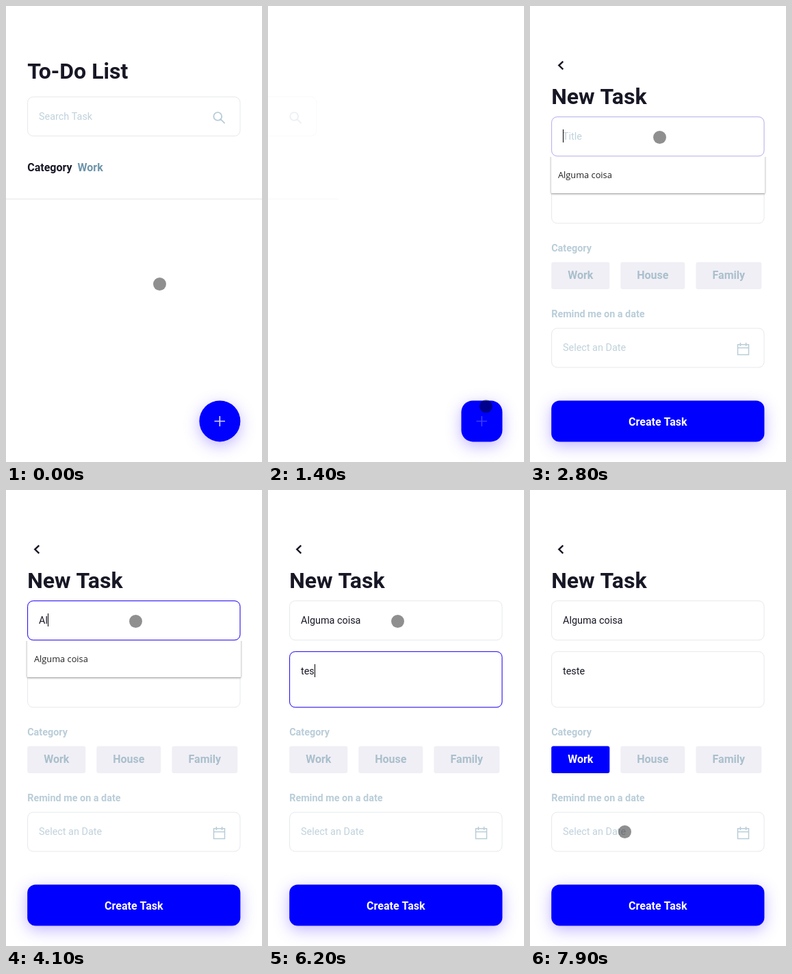
Animation of 374x665 px, one loop 8 s. Source, as an HTML page with a canvas:

```html
<!DOCTYPE html>
<html lang="en">
<head>
<meta charset="utf-8">
<title>To-Do List</title>
<style>
html, body { margin: 0; width: 100%; height: 100%; overflow: hidden; background: #fff; }
canvas { display: block; }
</style>
</head>
<body>
<canvas id="stage" width="374" height="665"></canvas>
<script>
const g = document.getElementById('stage').getContext('2d');
const LOOP = 8000, STEP = 100;
const WIDTH = 374, LEFT = 31.2, RIGHT = 342.4;
const INK = '#171725', PALE = '#b9cdd8', HINT = '#c0d2dc', BLUE = '#0000ff';
const REGULAR = '14.4px Roboto, sans-serif', BOLD = 'bold 16px Roboto, sans-serif';
const LABEL = 'bold 14.4px Roboto, sans-serif', TITLE = 'bold 32px Roboto, sans-serif';
const TITLE_FOCUS = 2800, NOTE_FOCUS = 5000, NOTE_BLUR = 7500;

// Pointer moves after its starting point
const start = { x: 224.5, y: 405.5 };
const moves = [
  { from: 100, to: 600, x: 324, y: 602.5 },
  { from: 1300, to: 1800, x: 227.5, y: 280.5 },
  { from: 2100, to: 2400, x: 189.5, y: 191.5 },
  { from: 6700, to: 7200, x: 89.5, y: 390.5 },
  { from: 7500, to: 7900, x: 138.5, y: 498.5 }
];

const between = (t, from, to) => t >= from && t < to;
const ramp = (t, from, to) => Math.min(1, Math.max(0, (t - from) / (to - from)));

function ease(t, from, to) {
  const k = ramp(t, from, to);
  return k * k * k * (10 - 15 * k + 6 * k * k);
}

// Border strength and caret of an input that is focused from one time to another
const glow = (t, from, to) => ramp(t, from - 100, from + 300) - ramp(t, to - 100, to + 300);
const caretOn = (t, from, to) => between(t, from, to) && (t - from) % 1200 < 600;

function text(s, x, y, font, color, align = 'left') {
  g.font = font;
  g.fillStyle = color;
  g.textAlign = align;
  g.fillText(s, x, y);
}

function box(x, y, w, h, r, fill, stroke) {
  g.beginPath();
  g.roundRect(x, y, w, h, r);
  if (fill) { g.fillStyle = fill; g.fill(); }
  if (stroke) { g.strokeStyle = stroke; g.lineWidth = 1; g.stroke(); }
}

function lines(d, color, width) {
  g.strokeStyle = color;
  g.lineWidth = width;
  g.stroke(new Path2D(d));
}

// Runs draw with the current opacity multiplied by alpha
function faded(alpha, draw) {
  if (alpha <= 0) return;
  g.save();
  g.globalAlpha *= alpha;
  draw();
  g.restore();
}

function field(y, h, focus = 0) {
  const x = LEFT + .4, w = RIGHT - LEFT - .8;
  box(x, y, w, h, 8, '#fff', '#e6e8eb');
  faded(focus, () => box(x, y, w, h, 8, null, '#1d00f5'));
}

function input(value, progress, hint, y, caret) {
  const typed = value.slice(0, Math.ceil(value.length * progress));
  text(typed || hint, 48, y, REGULAR, typed ? INK : HINT);
  if (caret) {
    g.fillStyle = '#000';
    g.fillRect(48 + Math.round(g.measureText(typed).width), y - 15, 1, 19);
  }
}

function listPage(t) {
  const k = ease(t, 900, 1700);
  faded(1 - k, () => {
    g.translate(-WIDTH * k, 0);
    text('To-Do List', LEFT, 106, TITLE, INK);
    field(132.6, 57);
    text('Search Task', 48, 166, REGULAR, HINT);
    lines('M315.2 161a5.9 5.9 0 1 1-11.8 0a5.9 5.9 0 1 1 11.8 0M313.6 165.2L319.6 171.2', PALE, 1.9);
    text('Category', LEFT, 241, BOLD, INK);
    text('Work', 104.5, 241, BOLD, '#6f95ab');
    g.fillStyle = '#e4e6e9';
    g.fillRect(0, 281, WIDTH, 1);
  });
}

function chip(label, x, w, on = 0) {
  const draw = (back, front) => {
    box(x, 373.5, w, 39.5, 3, back);
    text(label, x + w / 2, 398, BOLD, front, 'center');
  };
  draw('#f0eff5', '#a9bfcc');
  faded(on, () => draw(BLUE, '#fff'));
}

function suggestion() {
  g.save();
  g.beginPath();
  g.rect(20, 220, 334, 70);
  g.clip();
  g.shadowColor = 'rgba(0,0,0,.45)';
  g.shadowBlur = 3;
  g.shadowOffsetY = 1;
  box(31, 216, 312, 57, 1, '#fff');
  g.restore();
  text('Alguma coisa', 41, 251, '12.8px "Open Sans", sans-serif', '#222');
}

function formPage(t) {
  lines('M48.3 80.8L42.3 86.6L48.3 92.4', INK, 2.4);
  text('New Task', LEFT, 143, TITLE, INK);
  field(161.7, 57.2, glow(t, TITLE_FOCUS, NOTE_FOCUS));
  input('Alguma coisa', ramp(t, 4000, 4800) * (t > 4000), 'Title', 195, caretOn(t, TITLE_FOCUS, NOTE_FOCUS));
  field(235.7, 81.2, glow(t, NOTE_FOCUS, NOTE_BLUR));
  input('teste', ramp(t, 6100, 6300), 'Description', 269, caretOn(t, NOTE_FOCUS, NOTE_BLUR));
  if (between(t, TITLE_FOCUS, 4800)) suggestion();
  text('Category', LEFT, 358, LABEL, PALE);
  chip('Work', LEFT, 85.1, ramp(t, 7400, 7700));
  chip('House', 132.3, 94);
  chip('Family', 242.3, 96);
  text('Remind me on a date', LEFT, 454, LABEL, PALE);
  field(470, 57);
  text('Select an Date', 48, 503, REGULAR, HINT);
  lines('M303.5 493.7H319.5V508.5H303.5ZM303.5 498.5H319.5M307.4 491V496M315.6 491V496', PALE, 1.5);
}

function button(t, shown, pressed) {
  const size = 60, y = 575.4;
  const w = size + (RIGHT - LEFT - size) * shown, x = RIGHT - w;
  const inset = pressed ? 1.5 : 0;
  const r = 30 - 18 * ease(t, 900, 1700);
  g.save();
  g.shadowColor = 'rgba(80,40,255,.34)';
  g.shadowBlur = 22;
  g.shadowOffsetY = 6;
  box(x + inset, y + inset, w - 2 * inset, size - 2 * inset, r - inset, BLUE);
  g.restore();
  faded(1 - ease(t, 900, 1700), () => lines('M304.5 605.5H320M312.3 598V613', '#d6d6ff', 1.7));
  faded(shown, () => text('Create Task', x + w / 2, 612, BOLD, '#fff', 'center'));
  if (pressed) {
    g.fillStyle = 'rgba(0,180,240,.42)';
    g.fillRect(x, y, size, size);
  }
}

function pointer(t, pressed) {
  let { x, y } = start;
  for (const m of moves) {
    const k = ease(t, m.from, m.to);
    x += (m.x - x) * k;
    y += (m.y - y) * k;
  }
  g.beginPath();
  g.arc(x, y, pressed ? 10 : 9.5, 0, 7);
  g.fillStyle = pressed ? 'rgba(0,0,0,.6)' : 'rgba(0,0,0,.44)';
  g.fill();
  if (pressed) {
    g.strokeStyle = 'rgba(190,225,255,.6)';
    g.lineWidth = 1.5;
    g.stroke();
  }
}

function frame() {
  const t = Math.floor(performance.now() % LOOP / STEP) * STEP;
  const shown = ease(t, 2100, 2450);
  const pressed = between(t, 900, 1200);
  g.fillStyle = '#fff';
  g.fillRect(0, 0, WIDTH, 665);
  listPage(t);
  faded(shown, () => formPage(t));
  button(t, shown, pressed);
  pointer(t, pressed);
  requestAnimationFrame(frame);
}
frame();
</script>
</body>
</html>
```
